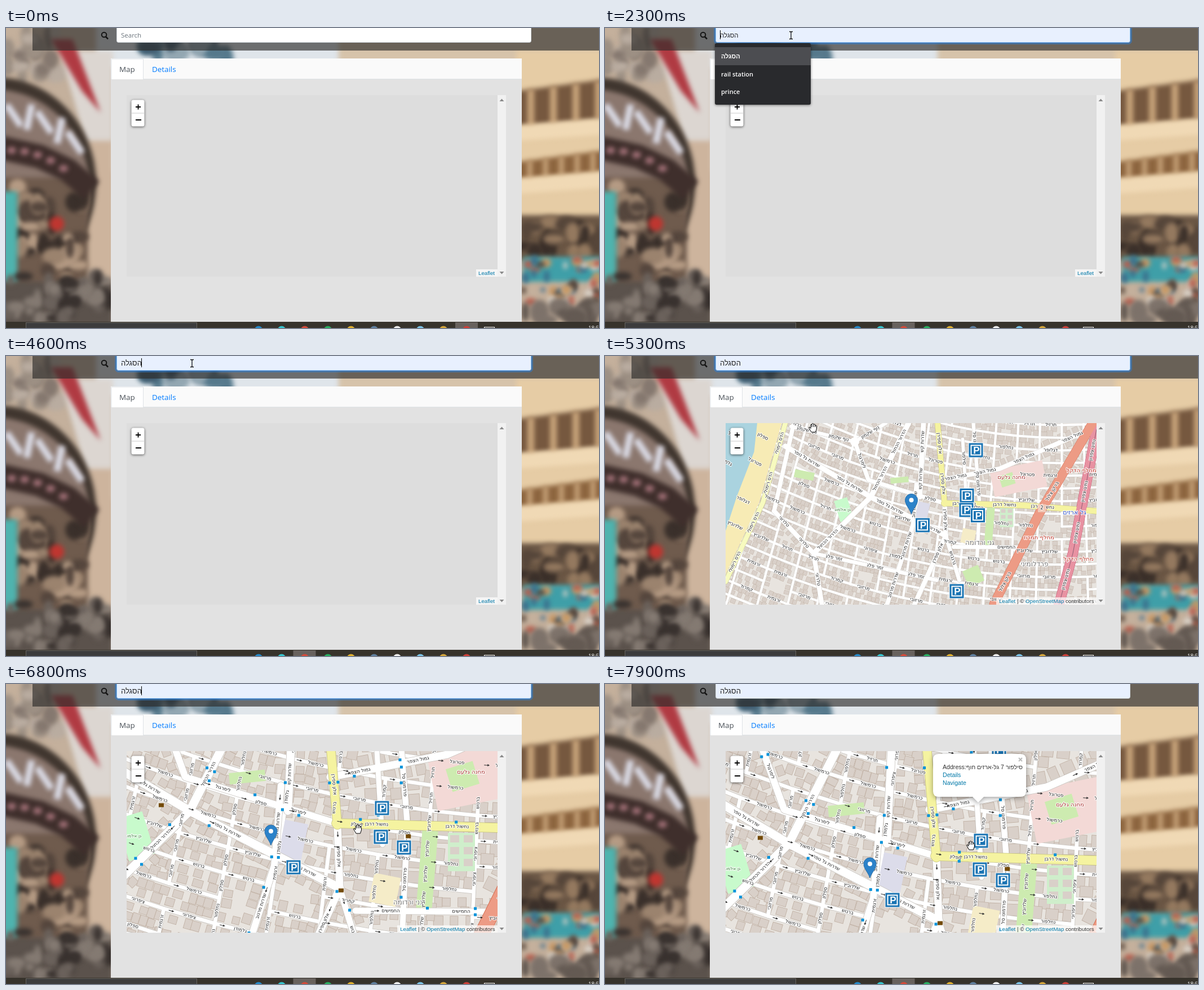
These frames come from a looping animation (1052x532 px, 8000 ms). An HTML page with a canvas:

```html
<!DOCTYPE html>
<html lang="en">
<head>
<meta charset="utf-8">
<title>Parking map</title>
<style>
html, body { margin: 0; width: 100%; height: 100%; overflow: hidden; }
canvas, svg.ui { position: absolute; left: 0; top: 0; }
#map { left: 214px; top: 119px; }
text { white-space: pre; font-family: "Open Sans", sans-serif; }
.small text { font-family: "Liberation Sans", Arial, sans-serif; }
.link { fill: #0078a8; }
.menu text { font-size: 11px; font-weight: 600; fill: #fff; }
</style>
</head>
<body>
<canvas id="page" width="1052" height="532"></canvas>
<canvas id="map" width="658" height="322"></canvas>
<svg class="ui" width="1052" height="532" viewBox="0 0 1052 532">
  <path d="M187 91V55H243.5V91" fill="#fff" stroke="#dee2e6"/>
  <text x="201" y="78" font-size="13.4" fill="#495057">Map</text>
  <text x="259" y="78" font-size="13.4" fill="#007bff">Details</text>

  <svg class="small" x="214" y="119" width="658" height="322" viewBox="214 119 658 322">
    <g id="popup" font-size="10.6">
      <path d="M592 124H737Q747 124 747 134V190Q747 200 737 200H672L662 210L652 200H592Q582 200 582 190V134Q582 124 592 124Z"
        fill="#fff" style="filter:drop-shadow(0 2px 5px rgba(0,0,0,.4))"/>
      <text x="599" y="151" fill="#333">Address:סילפור 7 גל-ארזים חוף</text>
      <text x="599" y="165" class="link">Details</text>
      <text x="599" y="179" class="link">Navigate</text>
      <path d="M734 131l6 6m0-6l-6 6" stroke="#bbb" stroke-width="2"/>
    </g>
    <rect x="222.5" y="127.5" width="23" height="47" rx="3.5" fill="#fff" style="filter:drop-shadow(0 1px 2px rgba(0,0,0,.65))"/>
    <path d="M223 151H245" stroke="#ccc"/>
    <path d="M230 140h9m-4.5-4.5v9M230 163h10" stroke="#000" stroke-width="1.8"/>
    <rect id="creditBox" y="428" height="13" fill="#fff" opacity=".7"/>
    <text id="creditShort" x="838" y="438" font-size="9.68" class="link">Leaflet</text>
    <text id="creditLong" x="867.5" y="438" font-size="9.68" text-anchor="end" fill="#333"><tspan class="link">Leaflet</tspan> | © <tspan class="link">OpenStreetMap</tspan> contributors</text>
  </svg>

  <circle cx="174" cy="12" r="4.3" fill="none" stroke="#151515" stroke-width="2"/>
  <path d="M177 15.5l4 4" stroke="#151515" stroke-width="2.5"/>
  <rect id="glow" x="194.5" y="-9" width="739" height="36.5" rx="5" fill="none" stroke="#2d7fd6" stroke-opacity=".55" stroke-width="3"/>
  <rect id="field" x="196.5" y="-9.5" width="735" height="35" rx="3"/>
  <text id="hint" x="204" y="17" font-size="11.5" fill="#6c757d">Search</text>
  <g class="small"><text id="query" x="204" y="17" fill="#222">הסגלה</text></g>
  <rect id="caret" y="4" width="1" height="16"/>

  <g id="menu" class="menu">
    <rect x="195" y="27" width="170" height="109" rx="3" fill="#292a2d" style="filter:drop-shadow(0 1px 2px rgba(0,0,0,.5))"/>
    <rect id="pick" x="195" y="34" width="170" height="32" fill="#4c4d51"/>
    <text x="206" y="54">הסגלה</text>
    <text x="206" y="86">rail station</text>
    <text x="206" y="117">prince</text>
  </g>

  <rect id="active" y="522" width="40" height="10" fill="#68625e"/>
  <g id="icons"></g>
  <text x="1033" y="535" font-size="9.5" fill="#fff">18:52</text>

  <g id="cursor" stroke-linejoin="round">
    <path id="arrow" d="M0 0V16L4 12.5L6.500 18.500L9 17.500L6.500 11.500H11.500Z" fill="#fff" stroke="#000"/>
    <path id="beam" d="M-3 -6.500H-1L0 -5.500L1 -6.500H3M0 -5.500V5.500M-3 6.500H-1L0 5.500L1 6.500H3" fill="none" stroke="#111" stroke-width="1.3"/>
    <path id="hand" d="M-3 8L-7 1Q-8 -1 -6 -1L-4 1.500V-5Q-3 -7 -2 -5V-6.500Q0 -8.500 1 -6.500V-5.500Q3 -7 4 -5V-3.500Q6 -5 6.500 -2.500V2L4.500 8ZM-2 -5V-1M1 -5.500V-1M4 -4V-1" fill="#fff" stroke="#000"/>
  </g>
</svg>
<script>
const LOOP = 8000, FRAME = 100;
const ANCHOR = { x: 617, y: 275 };               // point that stays put while zooming
const WORLD = { x: -189, y: -37, w: 1316, h: 646 };
const $ = id => document.getElementById(id);

function random(seed) {
  return () => {
    seed = (seed + 0x6D2B79F5) | 0;
    let v = Math.imul(seed ^ (seed >>> 15), 1 | seed);
    v = (v + Math.imul(v ^ (v >>> 7), 61 | v)) ^ v;
    return ((v ^ (v >>> 14)) >>> 0) / 4294967296;
  };
}
const pairs = list => list.reduce((out, v, i) => (i % 2 ? out[out.length - 1].push(v) : out.push([v]), out), []);

function trace(g, pts) {
  g.beginPath();
  pts.forEach(([x, y]) => g.lineTo(x, y));
}
function poly(g, color, ...list) {
  trace(g, pairs(list));
  g.fillStyle = color;
  g.fill();
}
function line(g, color, width, pts) {
  trace(g, pts);
  g.strokeStyle = color;
  g.lineWidth = width;
  g.stroke();
}
function box(g, color, x, y, w, h) {
  g.fillStyle = color;
  g.fillRect(x, y, w, h);
}
function oval(g, color, x, y, rx, ry = rx) {
  g.beginPath();
  g.ellipse(x, y, rx, ry, 0, 0, 7);
  g.fillStyle = color;
  g.fill();
}
function turned(g, x, y, a, draw) {
  g.save();
  g.translate(x, y);
  g.rotate(a);
  draw();
  g.restore();
}

// ---- page backdrop: a blurred street ----
function blotches(g, rnd, colors, count, x, y, w, h, size) {
  for (let i = 0; i < count; i++) {
    oval(g, colors[i % colors.length], x + rnd() * w, y + rnd() * h, size * (.5 + rnd()), size * (.5 + rnd()));
  }
}
function paintStreet(g) {
  const rnd = random(8);
  g.filter = 'blur(4px)';
  box(g, '#c4b09c', -20, -20, 1100, 570);
  box(g, '#dfe5ea', 160, -20, 480, 90);
  blotches(g, rnd, ['#56798c', '#3c586c', '#93a7b2'], 14, 240, 10, 190, 45, 18);
  box(g, '#d6c3aa', 590, -20, 480, 90);

  // shop front on the left
  blotches(g, rnd, ['#9d9084', '#85786f', '#b9aca0'], 20, 0, 0, 90, 90, 16);
  poly(g, '#dcd6d1', 95, 40, 190, 40, 190, 260, 150, 230);
  poly(g, '#b03a42', 80, 20, 118, 20, 168, 150, 135, 112);
  box(g, '#cdb49d', 140, 200, 50, 250);
  oval(g, '#40362f', -20, 275, 180, 188);
  oval(g, '#8b776e', -20, 285, 168, 176);
  for (let i = 0; i < 5; i++) turned(g, 14 + i * 27, 155 + i * i * 3, i % 2 ? .2 : -.6, () => box(g, '#dcdde8', -6, -23, 12, 46));
  box(g, '#6f5b4d', -20, 265, 165, 200);
  blotches(g, rnd, ['#3a302b', '#9b836e', '#55463d', '#b59b84'], 44, 20, 280, 125, 160, 14);
  line(g, '#3f2f2c', 42, pairs([-10, 212, 60, 228, 110, 252, 152, 288]));
  for (let i = 0; i < 5; i++) oval(g, '#a5737a', 10 + i * 23, 217 + i * i * 2, 8, 6);
  box(g, '#4fb3ae', -10, 290, 30, 165);
  oval(g, '#bf3630', 90, 347, 13);
  box(g, '#5b524c', -20, 450, 210, 90);
  blotches(g, rnd, ['#847a72', '#39322f', '#6b625c'], 40, 0, 440, 186, 80, 12);

  // rounded balconies on the right, each floor rising towards the edge
  const floor = (y, h, glass, step) => {
    poly(g, glass, 905, y + 14, 1070, y - 8, 1070, y + h - 6, 905, y + h + 8);
    for (let x = 925; x < 1052; x += step) box(g, '#c9a57b', x, y - (x - 915) / 8 + 12, step * .3, h);
    poly(g, '#f0d9b5', 905, y + h + 8, 1070, y + h - 6, 1070, y + h + 22, 905, y + h + 34);
  };
  box(g, '#e6cca5', 905, 40, 170, 300);
  floor(98, 68, '#76583f', 40);
  floor(224, 36, '#8d653f', 28);
  box(g, '#6b5745', 905, 332, 170, 80);
  blotches(g, rnd, ['#3b302a', '#94795f', '#56463a'], 22, 915, 340, 137, 65, 13);
  box(g, '#3f9fa8', 918, 406, 140, 44);
  blotches(g, rnd, ['#d9d0c5', '#b9604f', '#3b6c8a', '#57483e', '#c99a66'], 44, 915, 410, 137, 80, 7);
  blotches(g, rnd, ['#7d726a', '#645a53'], 16, 915, 495, 137, 30, 15);
  g.filter = 'none';
}
function paintPage() {
  const g = $('page').getContext('2d');
  paintStreet(g);
  box(g, 'rgba(45,43,42,.64)', 47, 0, 1005, 40);
  box(g, '#e2e2e2', 186, 54, 729, 468);
  box(g, '#fafafa', 186, 54, 729, 36);
  box(g, '#dee2e6', 186, 90, 729, 1);
  box(g, '#ddd', 214, 119, 658, 322);
  box(g, '#f1f1f1', 872, 119, 15, 322);
  for (const [y, dir] of [[128, -1], [434, 1]]) poly(g, '#8a8a8a', 875.5, y - 2 * dir, 883.5, y - 2 * dir, 879.5, y + 2.5 * dir);
  box(g, '#37332c', 0, 521, 1052, 11);
  box(g, '#67645f', 35, 522, 304, 10);
  box(g, '#3c3c3d', 36, 523, 302, 9);
  const icons = ['#2489ca', '#35c5cf', '#d44a3a', '#27ae60', '#e0b030', '#5f7f9f', '#f0f0f0', '#7cc4e8', '#d5a63b', '#cc3f38'];
  $('icons').innerHTML = icons.map((c, i) => `<circle cx="${448 + i * 41}" cy="536" r="7.5" fill="${c}"/>`).join('') +
    '<rect x="848.5" y="530.5" width="18" height="9" fill="none" stroke="#fff"/>';
}

// ---- street map, in pixels of the close zoom level ----
const AVENUES = [
  [15, 'שדרות גל נופר', 23, 45, 326, 225, 592, 362],
  [15, 'הדרור הכחול', 460, -37, 326, 225, 123, 425],
  [13, 'טלרוני', -17, 275, 123, 425, 153, 609],
  [11, 'זמר פלג', 123, 425, 560, 520],
  [14, 'שדרות קש', 513, -37, 500, 225],
  [12, 'שדרות מרנוב', 488, 180, 476, 322, 383, 609],
  [12, 'לימרגול', 269, 29, 318, 165, 586, 247],
  [13, 'אלון ספירן', 588, 250, 592, 362, 480, 609],
  [11, 'גרנבוש', 592, 362, 640, 520],
  [13, 'גמול הצפר', 575, 165, 783, 125, 1127, -25],
  [9, 'סילפור', 652, 20, 668, 285],
  [10, 'פרדמונו סל', 690, -37, 712, 251, 703, 442],
  [11, 'החמישים', 620, 402, 870, 404],
  [12, 'בר מלודה', 53, -37, -17, 275],
  [10, 'נוף שקמון', 43, -25, 269, 29, 380, -37],
];
const HIGHWAYS = [
  ['#f7fabf', '#c9cc8a', 13, 'הדס רימולי', 23, -37, -57, 245, -189, 525],
  ['#f5f3a0', '#c3c080', 15, 'אלון ספירן', 563, -37, 588, 250],
  ['#f5f3a0', '#c3c080', 16, 'נחשול דרבן', 586, 247, 872, 255, 1127, 275],
  ['#e892a2', '#c24b6b', 28, 'נתיב צפרון', 1127, -15, 1043, 425, 993, 609],
  ['#ed9b85', '#cf6649', 25, 'ברקן צלול', 1113, -37, 923, 285, 763, 605],
];
// centre, size and tilt
const PARKS = [
  ['#cdebb0', 428, 165, 64, 20, -.1], ['#c8facc', 230, 270, 48, 78, -.3], ['#cdebb0', 747, 330, 28, 140, .08],
  ['#cfeecb', 808, 298, 48, 68, 0], ['#dcdcea', 508, 283, 42, 78, .2], ['#f3d9d6', 850, 160, 190, 95, -.2],
  ['#cdebb0', 810, 164, 50, 42, -.3], ['#cdebb0', 90, 147, 70, 28, .2], ['#f5ecc8', 672, 365, 48, 52, .2], ['#cdebb0', 690, 505, 60, 60, -.4],
];
const PLACES = [
  ['מחנה גלעם', 825, 156, '#a33', 10], ['גני ורדומה', 713, 388, '#777', 12], ['מחלף תמרוז', 923, 369, '#c0392b', 10],
  ['מחלף הדקל', 1073, 131, '#c0392b', 10], ['מחלף הדקל', 1063, 445, '#c0392b', 10], ['גל ארזים', 1049, 281, '#35c', 11],
  ['פרדלומיני', 907, 465, '#777', 12], ['גן אלמוג', 226, 270, '#3a7a3a', 8],
];
const NAMES = ['גלמודן', 'ספלון', 'תרזיל', 'קמרוד', 'ברנוש', 'נחלפור', 'זרגמית', 'שלדוביץ', 'פטרונל', 'מרזובי', 'כרמשול', 'דגלופר', 'ציפרוני'];
const PARKING = [[699, 59], [667, 220], [665, 271], [706, 290], [510, 325], [631, 559]];
const PIN = [470, 286];

const rnd = random(21);
const road = ([w, name, ...list]) => ({ w, name, pts: pairs(list) });
const avenues = AVENUES.map(road);
const highways = HIGHWAYS.map(([fill, edge, ...rest]) => ({ fill, edge, ...road(rest) }));

// Side streets: a grid whose tilt fades from the sea towards the east.
const COLS = 20, ROWS = 26;
function corner(col, row) {
  const u = col * 84 - 340, v = row * 45 - 460, tilt = .5 - u / 2000;
  return [u - tilt * v * .6, v + u * .5 - u * u / 4000];
}
function sideStreets() {
  const out = [];
  const split = (count, at) => {
    for (let i = 0; i < count;) {
      const end = Math.min(count, i + 2 + (rnd() * 4 | 0)), pts = [];
      for (let n = i; n <= end; n++) pts.push(at(n));
      out.push({ w: 6.5, name: NAMES[rnd() * NAMES.length | 0], pts });
      i = end + (rnd() < .35 ? 1 : 0);
    }
  };
  for (let row = 0; row <= ROWS; row++) split(COLS, n => corner(n, row));
  for (let col = 0; col <= COLS; col++) split(ROWS, n => corner(col, n));
  return out;
}
function eachLeg(r, fn) {
  for (let i = 1; i < r.pts.length; i++) {
    const [x, y] = r.pts[i - 1], [x2, y2] = r.pts[i];
    fn(x, y, Math.atan2(y2 - y, x2 - x), Math.hypot(x2 - x, y2 - y));
  }
}
// Calls fn at even steps on both sides of a road.
function alongside(r, step, gap, fn) {
  eachLeg(r, (x, y, a, len) => {
    for (let s = step / 2; s < len; s += step) for (const side of [-1, 1]) {
      const off = side * (r.w / 2 + gap);
      fn(x + s * Math.cos(a) - off * Math.sin(a), y + s * Math.sin(a) + off * Math.cos(a), a);
    }
  });
}
const side = sideStreets();
const houses = [];
for (const r of [...avenues, ...highways, ...side]) alongside(r, 14, 11, (x, y, a) => {
  if (x < WORLD.x || y < WORLD.y || x > WORLD.x + WORLD.w || y > WORLD.y + WORLD.h) return;
  const big = x > 600 && y < 380 ? 1.3 : 1, w = (13 + rnd() * 6) * big, d = (14 + rnd() * 5) * big;
  if (!houses.some(o => Math.hypot(o.x - x, o.y - y) < (w + o.w) * .45)) houses.push({ x, y, a, w, d });
});

function paintMap(k) {
  const tile = document.createElement('canvas');
  tile.width = WORLD.w * k;
  tile.height = WORLD.h * k;
  const g = tile.getContext('2d'), fat = k < 1 ? 1.25 : 1, close = k === 1;
  g.scale(k, k);
  g.translate(-WORLD.x, -WORLD.y);
  g.lineJoin = g.lineCap = 'round';
  const pave = list => {
    list.forEach(r => line(g, r.edge || '#c9c5c0', r.w * fat + 1.6, r.pts));
    list.forEach(r => line(g, r.fill || '#fff', r.w * fat, r.pts));
  };
  box(g, '#e8e4df', WORLD.x, WORLD.y, WORLD.w, WORLD.h);
  for (const { x, y, a, w, d } of houses) turned(g, x, y, a, () => {
    box(g, '#bfafa2', -w / 2, -d / 2, w, d);
    box(g, '#d9d0c9', -w / 2 + .8, -d / 2 + .8, w - 1.6, d - 1.6);
  });
  pave(side);
  for (const [color, x, y, w, h, a] of PARKS) turned(g, x, y, a, () => box(g, color, -w / 2, -h / 2, w, h));
  for (let i = 0; i < 6; i++) box(g, '#d9d0c9', 788 + i % 2 * 24, 268 + (i >> 1) * 21, 16, 13);
  poly(g, '#f7ebb5', -189, -37, 10, -37, -70, 245, -189, 500);
  poly(g, '#aad3df', -189, -37, -77, -37, -88, 65, -150, 225, -189, 345);
  pave(avenues);
  oval(g, '#fff', 269, 29, 16);
  pave(highways);
  line(g, '#8d5f75', 2, highways[3].pts);

  const used = [];
  const label = (text, x, y, a = 0, color = '#222', size = 8.5) => {
    turned(g, x, y, Math.abs(a) > Math.PI / 2 ? a + Math.PI : a, () => {
      g.font = `${size / k}px "DejaVu Sans", sans-serif`;
      g.textAlign = 'center';
      g.textBaseline = 'middle';
      g.strokeStyle = 'rgba(255,255,255,.85)';
      g.lineWidth = 2.4 / k;
      g.strokeText(text, 0, 0);
      g.fillStyle = color;
      g.fillText(text, 0, 0);
    });
    used.push([x, y]);
  };
  const arrow = () => {
    box(g, '#333', -5, -.5, 7, 1);
    poly(g, '#333', 1, -2, 5, 0, 1, 2);
  };
  PLACES.forEach(([text, x, y, color, size]) => label(text, x, y, 0, color, size));
  for (const r of [...highways, ...avenues, ...side]) eachLeg(r, (x, y, a, len) => {
    const at = f => [x + Math.cos(a) * len * f, y + Math.sin(a) * len * f];
    for (let f = .5 / Math.ceil(len / 200); f < 1; f += 1 / Math.ceil(len / 200)) {
      const [mx, my] = at(f), fits = len * k > r.name.length * 5;
      if (fits && !used.some(([ux, uy]) => Math.hypot(ux - mx, uy - my) < 25 / k)) label(r.name, mx, my, a);
    }
    if (close && len > 60) turned(g, ...at(.15), a, arrow);
  });
  box(g, '#f0c9b8', 933 - 7 / k, 265 - 7 / k, 14 / k, 14 / k);
  label('2', 933, 265);
  if (close) {
    const pick = random(5);
    for (const r of [...avenues, ...highways.slice(1, 3)]) alongside(r, 85, 0, (x, y) => {
      const p = pick();
      if (p < .4) box(g, '#0092da', x - 2.5, y - 2.5, 5, 5);
      else if (p < .5) box(g, p < .44 ? '#ac39ac' : '#734a08', x - 4, y + 8, 9, 7);
    });
  }
  return tile;
}

// ---- timeline ----
const POINTER = [[100, 1004, 71], [1000, 330, 13], [4700, 330, 13], [5200, 369, 127], [6000, 369, 127], [6600, 615, 274],
  [6800, 624, 257], [7100, 664, 226], [7400, 650, 245], [7700, 650, 245], [7900, 649, 286]];

function pointerAt(t) {
  const next = POINTER.findIndex(p => p[0] > t);
  if (next < 1) return (next ? POINTER[POINTER.length - 1] : POINTER[0]).slice(1);
  const [t0, x0, y0] = POINTER[next - 1], [t1, x1, y1] = POINTER[next], f = (t - t0) / (t1 - t0);
  return [x0 + (x1 - x0) * f, y0 + (y1 - y0) * f];
}
// Progress from 0 to 1 that slows towards its end.
const ease = (t, start, length) => 1 - (1 - Math.min(1, Math.max(0, (t - start) / length))) ** 1.5;
const panAt = t => 58 * ease(t, 7100, 300);
const show = (id, on) => { $(id).style.display = on ? '' : 'none'; };
const set = (id, attrs) => { for (const key in attrs) $(id).setAttribute(key, attrs[key]); };

const far = paintMap(.5), near = paintMap(1);
const mapCtx = $('map').getContext('2d');

function parkingSign(g, x, y) {
  box(g, '#fff', x - 13.5, y - 13.5, 27, 27);
  box(g, '#1a74b3', x - 12.5, y - 12.5, 25, 25);
  g.strokeStyle = '#fff';
  g.lineWidth = 2;
  g.strokeRect(x - 8.5, y - 8.5, 17, 17);
  g.fillStyle = '#fff';
  g.font = 'bold 17px "Liberation Sans", sans-serif';
  g.textAlign = 'center';
  g.fillText('P', x + 1, y + 6);
}
function pin(g, x, y) {
  g.beginPath();
  g.moveTo(x, y);
  g.bezierCurveTo(x - 3, y - 10, x - 11, y - 16, x - 11, y - 25);
  g.arc(x, y - 25, 11, Math.PI, 0);
  g.bezierCurveTo(x + 11, y - 16, x + 3, y - 10, x, y);
  g.fillStyle = '#2c82c9';
  g.fill();
  g.strokeStyle = '#2a6ea8';
  g.lineWidth = 1;
  g.stroke();
  oval(g, '#fff', x, y - 25, 4);
}
function drawMap(t) {
  const g = mapCtx, zoom = ease(t, 6500, 300), k = (1 + zoom) / 2, pan = panAt(t);
  const at = ([x, y]) => [ANCHOR.x + (x - ANCHOR.x) * k, ANCHOR.y + (y - ANCHOR.y) * k + pan];
  g.setTransform(1, 0, 0, 1, -214, -119);
  g.clearRect(214, 119, 658, 322);
  if (t <= 4800) return;
  g.globalAlpha = ease(t, 4800, 300);
  g.drawImage(zoom === 1 ? near : far, ...at([WORLD.x, WORLD.y]), WORLD.w * k, WORLD.h * k);
  g.globalAlpha = 1;
  PARKING.forEach(p => parkingSign(g, ...at(p)));
  pin(g, ...at(PIN));
}
function drawUi(t) {
  const focus = t >= 1000 && t < 7100, filled = t >= 2300, chosen = t >= 2500, loaded = t >= 4900;
  const blink = Math.floor((t - (chosen ? 2600 : 1000)) / 500) % 2 === 0;
  show('glow', focus);
  set('field', { fill: filled ? '#e8f0fe' : '#fff', stroke: focus ? '#80bdff' : '#ced4da' });
  show('hint', !filled);
  show('query', filled);
  set('query', { 'font-size': chosen ? 13 : 11.5 });
  show('menu', t >= 1100 && !chosen);
  show('pick', filled);
  show('caret', focus && blink);
  set('caret', { x: chosen ? 240 : 204 });
  set('active', { x: t < 1100 ? 797 : 509.5 });
  set('creditBox', loaded ? { x: 694, width: 178 } : { x: 834, width: 38 });
  show('creditShort', !loaded);
  show('creditLong', loaded);
  set('popup', { opacity: ease(t, 7000, 200), transform: `translate(0 ${panAt(t) - 58})` });

  const [x, y] = pointerAt(t);
  const beam = y < 26 && x > 196 && x < 931, hand = y > 119;
  show('cursor', t >= 100);
  show('beam', beam);
  show('hand', hand);
  show('arrow', !beam && !hand);
  set('cursor', { transform: `translate(${x} ${y})` });
}
let last = -1;
function tick() {
  const t = Math.floor(performance.now() % LOOP / FRAME) * FRAME;
  if (t !== last) {
    drawMap(t);
    drawUi(t);
    last = t;
  }
  requestAnimationFrame(tick);
}
paintPage();
tick();
</script>
</body>
</html>
```
